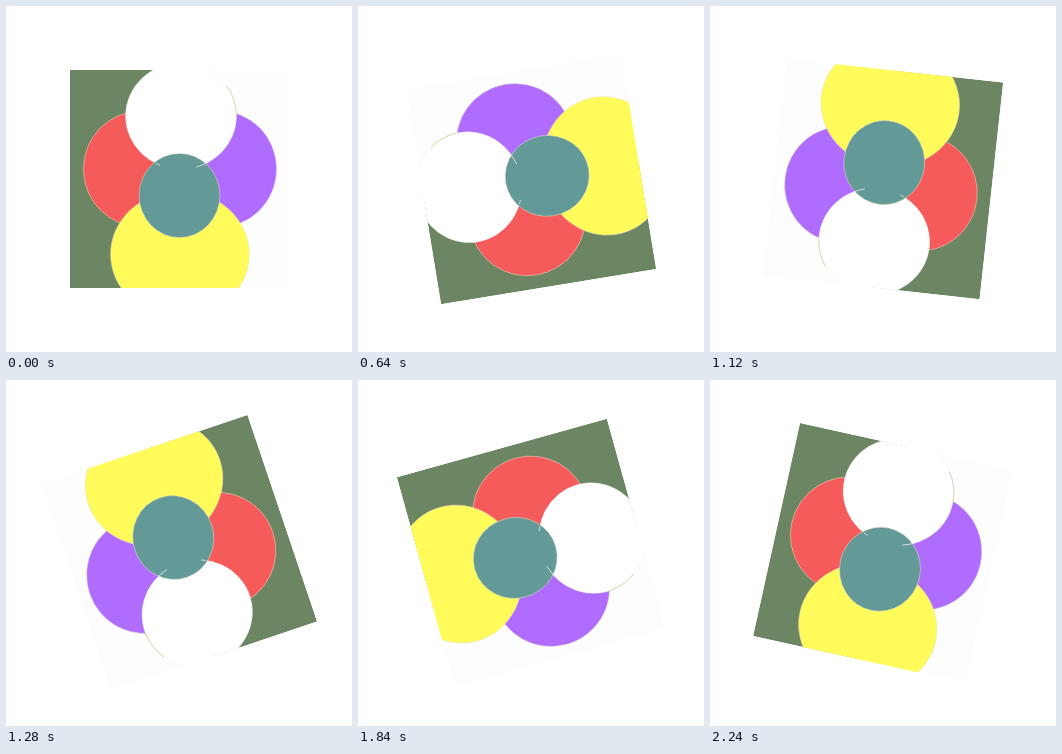
Write an HTML page that moves like this. It is 346 px wide and 346 px high and loops after 2.32 s.

```html
<!DOCTYPE html>
<html lang="en">
<head>
<meta charset="utf-8">
<title>Spinning flower</title>
<style>
  html, body { margin: 0; width: 100%; height: 100%; overflow: hidden; background: #fff; }
  svg { display: block; width: 100%; height: 100%; }
</style>
</head>
<body>
<svg viewBox="0 0 346 346">
  <defs>
    <clipPath id="card"><rect x="64" y="64" width="218" height="218"/></clipPath>
  </defs>
  <g id="flower">
    <g clip-path="url(#card)">
      <rect x="64" y="64" width="218" height="218" fill="#fdfdfd"/>
      <rect x="64" y="64" width="109" height="218" fill="#6c8562"/>
      <g stroke="#e6e2c4" stroke-width=".5">
        <ellipse cx="135" cy="163" rx="57.6" ry="58" fill="#f55b5b"/>
        <ellipse cx="213" cy="163" rx="57.6" ry="58.3" fill="#b06bff"/>
        <ellipse cx="174" cy="248.3" rx="69.4" ry="63.3" fill="#fffb5a"/>
        <ellipse cx="175" cy="110" rx="55.4" ry="53.1" fill="#fff" stroke="#f4f4ec"/>
        <ellipse cx="173.5" cy="189.5" rx="40.4" ry="42.1" fill="#639a97"/>
      </g>
      <g fill="none" stroke-width=".8">
        <path d="M220.5 79.5A55.4 53.1 0 0 1 230.4 108" stroke="#d4ce98"/>
        <path d="M203 155.8A55.4 53.1 0 0 1 190 161.2M154 159.2A55.4 53.1 0 0 1 150 157.4" stroke="#e4ece8"/>
      </g>
    </g>
  </g>
</svg>
<script>
  const STEPS = 29, STEP_MS = 80;
  const flower = document.getElementById("flower");
  const start = performance.now();

  function draw(now) {
    const step = Math.floor(Math.max(0, now - start) / STEP_MS) % STEPS;
    flower.setAttribute("transform", `rotate(${-360 * step / STEPS} 173 173)`);
    requestAnimationFrame(draw);
  }
  draw(start);
</script>
</body>
</html>
```
